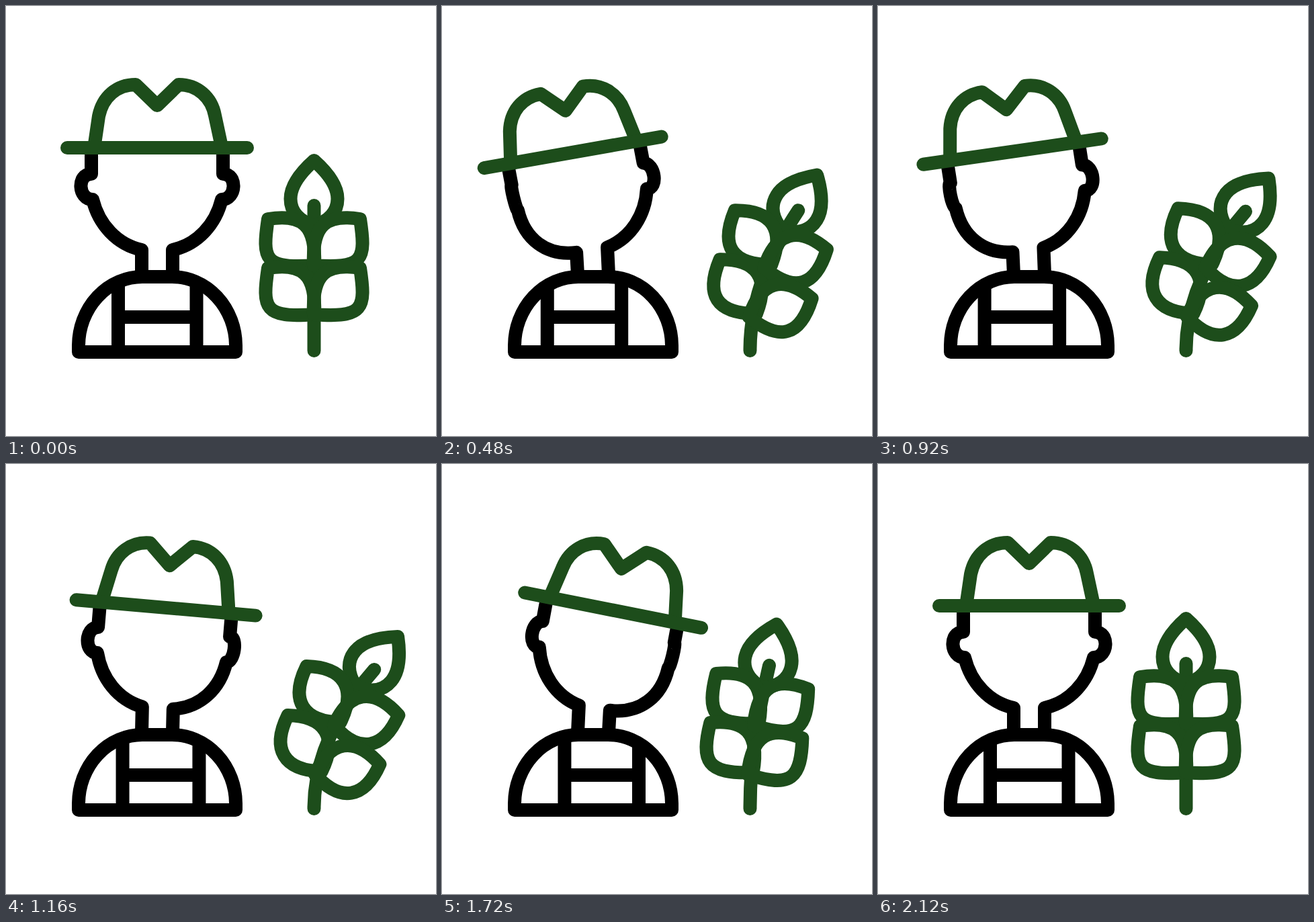
An HTML page that plays this animation: 640 px wide and 640 px high, repeating every 2.4 s.

```html
<!DOCTYPE html>
<html lang="en">
<head>
<meta charset="utf-8">
<title>Farmer and wheat</title>
<style>
  html, body { margin: 0; width: 100%; height: 100%; overflow: hidden; background: #fff; }
  svg { display: block; width: 100%; height: 100%; }
  path { fill: none; stroke-width: 20; stroke-linejoin: round; }
  .ink { stroke: #000; }
  .green { stroke: #1d4d1b; }
  .round { stroke-linecap: round; }
</style>
</head>
<body>
<svg viewBox="0 0 640 640">
  <g id="farmer">
    <path class="ink" id="straps"/>
    <path class="ink" d="M108 515V505A95 103 0 0 1 203 403H247A95 103 0 0 1 342 505V515Z"/>
    <path class="ink" id="face"/>
    <g id="hat">
      <path class="green" d="M-93 -6L-87 -47C-81 -76 -60 -94 -32 -94L0 -63L32 -94C60 -94 81 -75 86 -48L95 -6"/>
      <path class="green round" d="M-134 0H134"/>
    </g>
  </g>
  <g id="wheat">
    <path class="green round" id="stem"/>
    <path class="green" id="drop"
      d="M0 0C-18 16 -35 37 -35 57C-35 77 -22 90 0 97C22 90 35 77 35 57C35 37 18 16 0 0Z"/>
  </g>
</svg>
<script>
const LOOP = 2400, STEP = 20, CENTER = 225, STALK = 458.5;
const $ = id => document.getElementById(id);
const mix = (a, b, k) => a + (b - a) * k;

// Eases from 0 to 1 between two times
function ease(t, from, to) {
  const u = Math.min(1, Math.max(0, (t - from) / (to - from)));
  return u * u * (3 - 2 * u);
}

// -1 is turned left, 1 is turned right
const turnAt = t => 2 * ease(t, 720, 1440) - ease(t, 140, 640) - ease(t, 1520, 2120);
// 0 is upright, 1 is bent over: a quick rise that settles, then a smooth return
const bendAt = t => (1 - Math.exp(-((t / 348) ** 1.45))) * (1 - ease(t, 1420, 1900));

// One half of the face, skewed by the turn; side -1 is the half that turns away
function halfFace(side, q) {
  const far = side < 0;
  const skew = (x, y) => [CENTER + side * x - .25 * q * (373 - y), y - .22 * q * side * x];
  const ear = side * (far ? 22 * (1 - q) ** 1.5 : 22 - 6 * q);
  const puff = far ? 10 * q : 0;
  const out = ([x, y]) => [x + ear, y];
  const jaw = ([x, y]) => [x - .8 * puff, y + puff];
  const a = skew(98, 250), b = skew(96, 288);
  return `M${skew(98, 212)}L${a}C${out(a)} ${out(b)} ${b}`
    + `C${jaw(skew(87, 325))} ${jaw(skew(60, 355))} ${skew(23, 363)}L${CENTER + side * 23} 400`;
}

function drawFarmer(turn) {
  const q = Math.abs(turn), right = turn > 0;
  const angle = (right ? 15.2 : 13.2) * q;
  const a = 167 - 13.5 * q, b = 283.5 - 21.5 * q;
  // The right turn is the left turn in a mirror
  $('farmer').setAttribute('transform', right ? `translate(${2 * CENTER} 0) scale(-1 1)` : '');
  $('straps').setAttribute('d', `M${a} 412V515M${b} 412V515M${a} 463H${b}`);
  $('face').setAttribute('d', halfFace(-1, q) + halfFace(1, q));
  $('hat').setAttribute('transform', `translate(${CENTER - 40 * q} ${211 + 9 * q}) rotate(${-angle})`);
}

// Leaves hang from their outer tip, in two rows
const leaves = [];
for (const side of [-1, 1]) {
  for (const row of [0, 1]) {
    const el = document.createElementNS('http://www.w3.org/2000/svg', 'path');
    el.setAttribute('class', 'green');
    $('wheat').append(el);
    leaves.push({ el, side, row });
  }
}

// A square leaf that rounds into an even lens
function leafPath(k) {
  const p = (x0, y0, x1, y1) => [mix(x0, x1, k), mix(y0, y1, k)];
  return `M0 0C${p(50, -8, 55, -12)} ${p(72, 8, 81, 14)} 69 69`
    + `C${p(-6, 75, 14, 81)} ${p(-9, 60, -12, 55)} 0 0Z`;
}

function drawWheat(bend) {
  const at = (x, y, dx, dy) => `${x + dx * bend} ${y + dy * bend}`;
  $('stem').setAttribute('d', `M${STALK} 513C${STALK} 430 ${at(STALK, 370, 42, -10)} ${at(STALK, 297, 90, 9)}`);
  $('drop').setAttribute('transform', `translate(${at(STALK, 230, 125, 27)}) rotate(${40 * bend})`);
  for (const { el, side, row } of leaves) {
    const tip = at(STALK + 68.5 * side, 317 + 73 * row, 57.5 - 28 * row, 20.5 + 36.5 * side);
    el.setAttribute('d', leafPath(bend));
    el.setAttribute('transform', `translate(${tip}) rotate(${(25 + 11 * side) * bend}) scale(${-side} 1)`);
  }
}

function draw(ms) {
  const t = Math.floor((ms % LOOP) / STEP) * STEP;
  drawFarmer(turnAt(t));
  drawWheat(bendAt(t));
}

let start;
function tick(now) {
  start ??= now;
  draw(now - start);
  requestAnimationFrame(tick);
}
draw(0);
requestAnimationFrame(tick);
</script>
</body>
</html>
```
